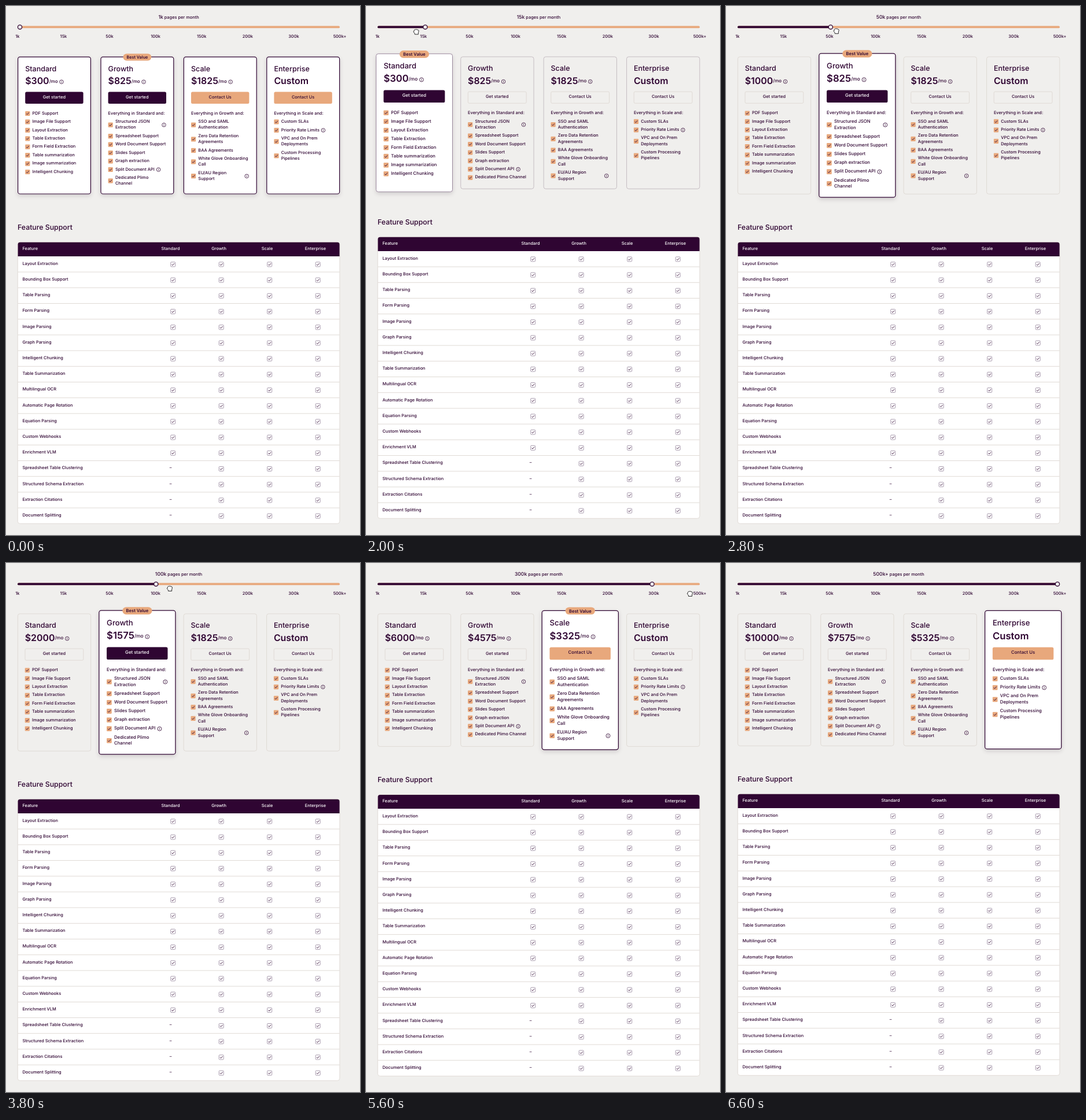
Recreate the animation shown at these times as an HTML page. Size 612 px wide and 915 px high, loop 7.8 s.

```html
<!DOCTYPE html>
<html lang="en">
<head>
<meta charset="utf-8">
<title>Pricing slider</title>
<style>
  html, body { margin: 0; width: 100%; height: 100%; overflow: hidden; background: #f0efed; }
  svg { display: block; width: 612px; height: 915px; }
  text { font: 500 7.4px Inter, "Open Sans", sans-serif; text-rendering: geometricPrecision; }
  .lift { filter: drop-shadow(0 3.5px 3.5px rgba(40, 20, 40, .16)); }
</style>
</head>
<body>
<svg id="stage" viewBox="0 0 612 915"></svg>
<script>
const LOOP = 7800, STEP = 200;
const INK = '#2f0532', PAPER = '#f0efed', ORANGE = '#e8a87c', LINE = '#d8d1cb';
const stage = document.getElementById('stage');
const pen = document.createElement('canvas').getContext('2d');

// "|" breaks a line, a trailing number places an info icon from the card's left edge
const plans = [
  { name: 'Standard', button: 'Get started', intro: '',
    price: k => Math.max(300, k * 20),
    items: ['PDF Support', 'Image File Support', 'Layout Extraction', 'Table Extraction',
      'Form Field Extraction', 'Table summarization', 'Image summarization', 'Intelligent Chunking'] },
  { name: 'Growth', button: 'Get started', intro: 'Everything in Standard and:',
    price: k => Math.max(825, k * 15 + 75),
    items: [['Structured JSON|Extraction', 109.6], 'Spreadsheet Support', 'Word Document Support',
      'Slides Support', 'Graph extraction', ['Split Document API', 100.2], 'Dedicated Plimo|Channel'] },
  { name: 'Scale', button: 'Contact Us', intro: 'Everything in Growth and:',
    price: k => Math.max(1825, k * 10 + 325),
    items: ['SSO and SAML|Authentication', 'Zero Data Retention|Agreements', 'BAA Agreements',
      'White Glove Onboarding|Call', ['EU/AU Region|Support', 109.4]] },
  { name: 'Enterprise', button: 'Contact Us', intro: 'Everything in Scale and:',
    items: ['Custom SLAs', ['Priority Rate Limits', 98.2], 'VPC and On Prem|Deployments',
      'Custom Processing|Pipelines'] }
];
const features = ['Layout Extraction', 'Bounding Box Support', 'Table Parsing', 'Form Parsing',
  'Image Parsing', 'Graph Parsing', 'Intelligent Chunking', 'Table Summarization', 'Multilingual OCR',
  'Automatic Page Rotation', 'Equation Parsing', 'Custom Webhooks', 'Enrichment VLM',
  'Spreadsheet Table Clustering', 'Structured Schema Extraction', 'Extraction Citations', 'Document Splitting'];

const volumes = [1, 15, 50, 100, 150, 200, 300, 500];
const volumeName = i => volumes[i] + 'k' + (i === 7 ? '+' : '');
const bestPlan = [-1, 0, 1, 1, 2, 2, 2, 3];   // -1: every plan is active
const stopTimes = [0, 2000, 2600, 3200, 4000, 4600, 5200, 5800];
const cursorPath = [[400, 3, 30], [1400, 26, 39], [1800, 60, 45], [2600, 167, 43], [3400, 262, 44],
  [3600, 262, 44], [3800, 283, 44], [4200, 338, 47], [5600, 560, 53], [6000, 592, 54],
  [6200, 330, 440], [6400, 47, 898]];

const rect = (x, y, w, h, r, fill, more = '') =>
  `<rect x="${x}" y="${y}" width="${w}" height="${h}" rx="${r}" fill="${fill}" ${more}/>`;
const stroke = (color, width) => `stroke="${color}" stroke-width="${width}"`;
const text = (x, y, s, { size = 7.4, anchor = 'start', fill = INK, weight = 500 } = {}) =>
  `<text x="${x}" y="${y}" fill="${fill}" text-anchor="${anchor}" style="font-size:${size}px;font-weight:${weight}">${s}</text>`;
const middle = (x, y, s, more) => text(x, y, s, { anchor: 'middle', ...more });
const tick = (x, y) =>
  `<path d="M${x - 2.3} ${y + .1}l1.6 1.6 3.1-3.4" fill="none" ${stroke(INK, .9)}/>`;
const info = (x, y) =>
  `<circle cx="${x}" cy="${y}" r="3.3" fill="none" ${stroke(INK, .8)}/>` +
  `<path d="M${x} ${y - .4}v2M${x} ${y - 1.8}v.9" ${stroke(INK, .8)}/>`;

function textWidth(s, size, weight) {
  pen.font = `${weight} 100px Inter, "Open Sans", sans-serif`;
  return pen.measureText(s).width * size / 100;
}

function itemList(plan, x, wrapLast) {
  let y = 187.7, out = '';
  if (plan.intro) {
    out += text(x + 13.2, y, plan.intro);
    y += 14.4;
  }
  for (const item of plan.items) {
    let [label, iconX] = [].concat(item);
    if (!wrapLast && label.startsWith('Dedicated')) label = label.replace('|', ' ');
    const lines = label.split('|');
    const mid = y - 1.7 + (lines.length - 1) * 5.15;
    out += rect(x + 13.2, mid - 4.1, 8.2, 8.2, 1, ORANGE) + tick(x + 17.3, mid);
    lines.forEach((s, i) => out += text(x + 25.5, y + i * 10.3, s));
    if (iconX) out += info(x + iconX, mid + .1);
    y += 14.43 + (lines.length - 1) * 10.3;
  }
  return out;
}

function priceLine(plan, x, k) {
  const look = { size: 15.9, weight: 600 };
  if (!plan.price) return text(x, 135, 'Custom', look);
  const price = '$' + plan.price(k);
  const end = x + textWidth(price, look.size, look.weight);
  return text(x, 135, price, look) + text(end, 132.6, '/mo', { size: 8 }) +
    info(end + textWidth('/mo', 8, 500) + 6.4, 131.2);
}

function card(i, stop, bottom, fresh) {
  const plan = plans[i], best = bestPlan[stop];
  const all = best < 0, on = all || best === i;
  const leaving = fresh && (bestPlan[stop - 1] < 0 || bestPlan[stop - 1] === i);
  const left = 20 + i * 143.4, width = 127, top = 87.5;
  const bold = on && !fresh;
  const edge = on ? (fresh ? '#7d6481' : INK) : leaving ? '#b3a8b1' : LINE;
  const line = bold ? 1.2 : .7;
  let out = rect(left + line / 2, top + line / 2, width - line, bottom - top - line, 3.6,
    on ? '#fff' : PAPER, stroke(edge, line) + (on ? ' class="lift"' : ''));

  const x = left + (bold ? 0 : -.5);
  const buttonWidth = bold ? 100.4 : 101.4;
  let body = text(x + 13.2, 112.5, plan.name, { size: 12.5 });
  body += priceLine(plan, x + 13.2, volumes[stop]);
  const dark = on && i < 2;
  body += on
    ? rect(x + 13.2, 148.4, buttonWidth, 20.6, 2.5, dark ? INK : ORANGE)
    : rect(x + 13.5, 148.7, buttonWidth - .6, 20, 2, 'none', stroke(LINE, .7));
  body += middle(x + 13.2 + buttonWidth / 2, 159.6, plan.button, { fill: dark ? '#fff' : INK });
  body += itemList(plan, x, bold);
  out += `<g transform="translate(0 ${bold ? 0 : -.5})">${body}</g>`;

  const cx = left + width / 2, cy = (top + bottom) / 2;
  if (i < 3 && (all ? i === 1 : on)) {
    out += rect(cx - 24.4, 82.5, 48.8, 12, 6, ORANGE) +
      middle(cx, 91.1, 'Best Value', { size: 7.2, weight: 600 });
  }
  if (!on || all) return out;
  const zoom = fresh ? 1.045 : 1.05;
  return `<g transform="translate(${cx} ${cy}) scale(${zoom}) translate(${-cx} ${-cy})">${out}</g>`;
}

function slider(stop) {
  const x = 24 + stop * 78.43;
  let out = `<text x="298.5" y="21.8" fill="${INK}" text-anchor="middle"><tspan style="font-size:8.6px">${volumeName(stop)}</tspan> pages per month</text>`;
  out += rect(20, 34.5, 557, 3.8, 1.9, ORANGE) + rect(20, 34.5, x - 20, 3.8, 1.9, INK);
  out += `<circle cx="${x}" cy="36.4" r="3.6" fill="${PAPER}" ${stroke(INK, 1.3)}/>`;
  volumes.forEach((_, i) => out += middle(19.8 + i * 79.6, 55.2, volumeName(i)));
  return out;
}

// Built once; only its vertical place changes
function featureTable() {
  const head = 24.7, row = 27.2, height = head + row * features.length;
  const column = c => 284.5 + c * 83.5;
  let out = text(20, -21.6, 'Feature Support', { size: 12.3 });
  out += rect(20.3, .3, 556.6, height - .3, 4, '#fff', stroke(LINE, .7));
  out += `<path d="M20.6 ${head}V4.2q0-3.6 3.6-3.6H573q3.6 0 3.6 3.6V${head}z" fill="${INK}"/>`;
  out += text(28.4, 13.4, 'Feature', { fill: '#fff' });
  plans.forEach((p, c) => out += middle(column(c), 13.4, p.name, { fill: '#fff' }));
  features.forEach((name, r) => {
    const y = head + r * row;
    if (r) out += `<path d="M20.6 ${y}H576.6" ${stroke(LINE, .8)}/>`;
    out += text(28.4, y + 15, name);
    for (let c = 0; c < 4; c++) {
      const x = column(c) + 4.2, mid = y + 14;
      out += !c && r > 12
        ? middle(column(c), y + 15, '–')
        : rect(x - 4, mid - 4, 8, 8, 1.3, '#fff', stroke('#94839a', .8)) + tick(x, mid);
    }
  });
  return out;
}
const table = featureTable();

function cursor(t) {
  const n = cursorPath.findIndex(p => p[0] >= t);
  if (t < 400 || n < 0) return '';
  const b = cursorPath[n], a = cursorPath[Math.max(0, n - 1)];
  const f = b === a ? 0 : (t - a[0]) / (b[0] - a[0]);
  const x = a[1] + (b[1] - a[1]) * f, y = a[2] + (b[2] - a[2]) * f;
  const shape = t > 6000
    ? 'M0 0V9L2.1 7.1 3.4 10 4.8 9.4 3.5 6.6H6.3z'
    : 'M-3.6-1.2C-3.6-4.2-1.6-4-1.5-3.2C-1-4.6.8-4.4.9-3.3C1.5-4.3 2.9-3.8 2.8-2.7' +
      'C3.8-3.2 4.6-2.5 4.4-1L3.6 2V4.5H-2.5L-2.6 2.8L-4.6.4C-5-.8-4-1-3.6-.6z';
  return `<path transform="translate(${x} ${y})" d="${shape}" fill="#fff" ${stroke('#111', .9)} stroke-linejoin="round"/>`;
}

// The tallest card sets the row's height: a wrapped last item, or the active third plan
function cardBottom(best, fresh) {
  if (fresh) return 316.6;
  return best === -1 || best === 1 ? 325.6 : best === 2 ? 317.7 : 316.6;
}

function draw(t) {
  const stop = stopTimes.filter(s => s <= t).length - 1;
  const best = bestPlan[stop];
  const fresh = stop > 0 && best !== bestPlan[stop - 1] && t - stopTimes[stop] < STEP;
  const bottom = cardBottom(best, fresh);
  const order = [0, 1, 2, 3].sort((a, b) => (a === best) - (b === best));
  stage.innerHTML = rect(0, 0, 612, 915, 0, PAPER) + slider(stop) +
    order.map(i => card(i, stop, bottom, fresh)).join('') +
    `<g transform="translate(0 ${bottom + 82.6})">${table}</g>` + cursor(t);
}

const start = performance.now();
let shown = -1;
function run() {
  const t = Math.floor((performance.now() - start) % LOOP / STEP) * STEP;
  if (t !== shown) draw(shown = t);
  requestAnimationFrame(run);
}
run();
</script>
</body>
</html>
```
